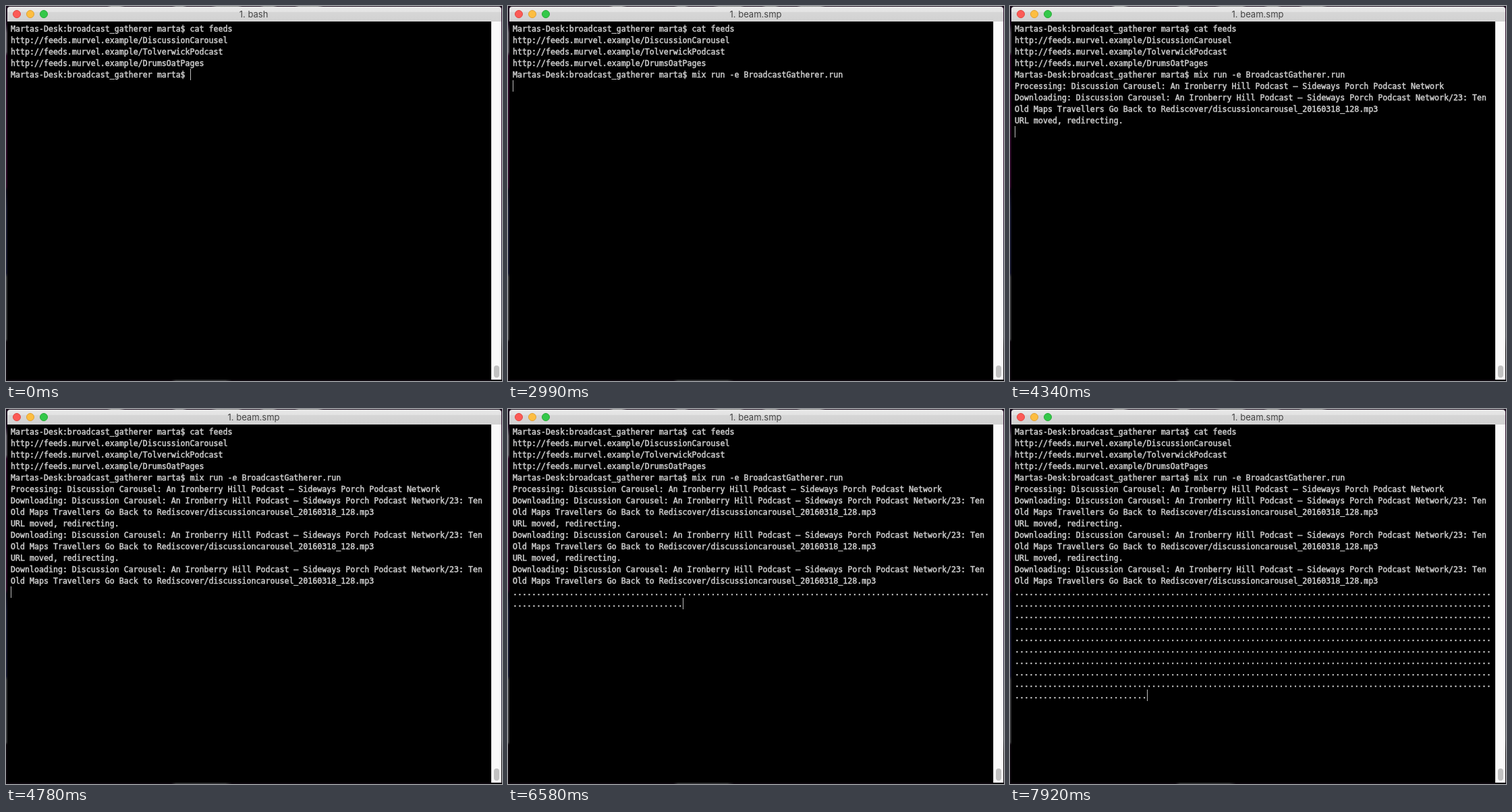
These frames come from a looping animation (735 px wide and 556 px high, 8000 ms). An HTML page:

```html
<!DOCTYPE html>
<html lang="en">
<head>
<meta charset="utf-8">
<title>Terminal</title>
<style>
  html, body { margin: 0; width: 100%; height: 100%; overflow: hidden; background: #0b040c; }
  #stage { position: relative; width: 735px; height: 556px; overflow: hidden; }
  #stage > * { position: absolute; }
  #left {
    left: 0; top: 0; width: 2px; height: 556px;
    background: linear-gradient(#1c0a20 26px, #55505a 40px 68px, #2a0826 74px 268px,
      #0c0a18 274px, #17182e 300px 396px, #363638 402px 494px, #0c060c 498px);
  }
  #right {
    left: 734px; top: 0; width: 1px; height: 556px;
    background: linear-gradient(#2a0a2a 270px, #1a1630 380px, #2c2c34 490px, #0c060c 510px);
  }
  #top {
    left: 0; top: 0; width: 735px; height: 1px;
    background: linear-gradient(90deg, #1a0c1c 150px, #8a8a8a 156px 168px, #1a0c1c 176px 246px,
      #77777a 252px 262px, #1a0c1c 268px 304px, #777 312px 344px, #1a0c1c 350px 376px,
      #777 382px 396px, #1a0c1c 402px 428px, #808080 434px 462px, #1a0c1c 470px);
  }
  #bottom {
    left: 0; top: 554px; width: 735px; height: 2px;
    background: linear-gradient(90deg, #0d070e 245px, #2e2e30 252px 325px, #0d070e 335px);
  }
  #bar {
    left: 2px; top: 1px; width: 732px; height: 22px; border-radius: 4px 4px 0 0;
    background: linear-gradient(#e9e9e9, #e2e2e2 8px, #d6d6d6 8px, #d2d2d2);
  }
  #title {
    left: 2px; top: 4px; width: 730px; text-align: center;
    font: 13px/17px Inter, sans-serif; color: #444;
  }
  .light { top: 6px; width: 10px; height: 10px; border: 1px solid; border-radius: 50%; }
  #screen { left: 2px; top: 23px; width: 717px; height: 531px; background: #000; }
  #track {
    left: 719px; top: 23px; width: 14px; height: 531px;
    border-left: 1px solid #e8e8e8; background: #fafafa;
  }
  #thumb { left: 723px; top: 533px; width: 8px; height: 18px; border-radius: 4px; background: #c1c1c1; }
  #text {
    left: 7px; top: 26px; margin: 0; color: #cbcbcb;
    font: 11.627px/17px "DejaVu Sans Mono", monospace;
    font-variant-ligatures: none; -webkit-text-stroke: 0.5px #cbcbcb;
  }
  #cursor { left: 7px; top: 25px; width: 1px; height: 17px; background: #bbb; }
</style>
</head>
<body>
<div id="stage">
  <div id="left"></div>
  <div id="right"></div>
  <div id="top"></div>
  <div id="bottom"></div>
  <div id="bar"></div>
  <div class="light" style="left:10px;background:#fc5b57;border-color:#e2463f"></div>
  <div class="light" style="left:30px;background:#fdbe41;border-color:#e0a034"></div>
  <div class="light" style="left:50px;background:#34c84a;border-color:#27aa35"></div>
  <div id="title"></div>
  <div id="screen"></div>
  <div id="track"></div>
  <div id="thumb"></div>
  <pre id="text"></pre>
  <div id="cursor"></div>
</div>
<script>
  const LOOP = 8000, COLS = 101, CELL = 7, ROW = 17;
  const byId = id => document.getElementById(id);
  const [text, title, cursor] = ['text', 'title', 'cursor'].map(byId);

  const prompt = 'Martas-Desk:broadcast_gatherer marta$ ';
  const feeds = ['DiscussionCarousel', 'TolverwickPodcast', 'DrumsOatPages']
    .map(name => `http://feeds.murvel.example/${name}\n`).join('');
  const start = `${prompt}cat feeds\n${feeds}${prompt}`;
  const command = 'mix run -e BroadcastGatherer.run';
  const show = 'Discussion Carousel: An Ironberry Hill Podcast – Sideways Porch Podcast Network';
  const processing = `Processing: ${show}\n`;
  const download = `Downloading: ${show}/23: Ten\n` +
    'Old Maps Travellers Go Back to Rediscover/discussioncarousel_20160318_128.mp3\n';
  const moved = 'URL moved, redirecting.\n';

  // Each step: start time and the text after the second prompt.
  const steps = [[0, ''], [1050, 'cat feeds '], [1190, command]];
  let output = command;
  const print = (time, added) => steps.push([time, output += added]);
  print(2390, '\n');
  print(4040, processing);
  print(4190, download);
  print(4340, moved);
  print(4630, download + moved);
  print(4780, download);

  const dotCounts = [
    [6130, 9], [6280, 26], [6430, 54], [6580, 137], [6730, 229], [6880, 321], [7030, 399],
    [7180, 475], [7330, 567], [7470, 660], [7620, 752], [7770, 845], [7920, 937]
  ];
  const wrap = s => s.replace(new RegExp(`.{${COLS}}`, 'g'), '$&\n');
  for (const [time, count] of dotCounts) steps.push([time, output + wrap('.'.repeat(count))]);

  let shown = null;
  function draw(now) {
    const t = now % LOOP;
    const step = steps.findLast(([time]) => time <= t);
    title.textContent = t < 2990 ? '1. bash' : '1. beam.smp';
    if (step !== shown) {
      shown = step;
      const content = start + step[1];
      const lines = content.split('\n');
      text.textContent = content;
      cursor.style.transform =
        `translate(${lines.at(-1).length * CELL}px, ${(lines.length - 1) * ROW}px)`;
    }
    requestAnimationFrame(() => draw(performance.now()));
  }
  draw(performance.now());
</script>
</body>
</html>
```
